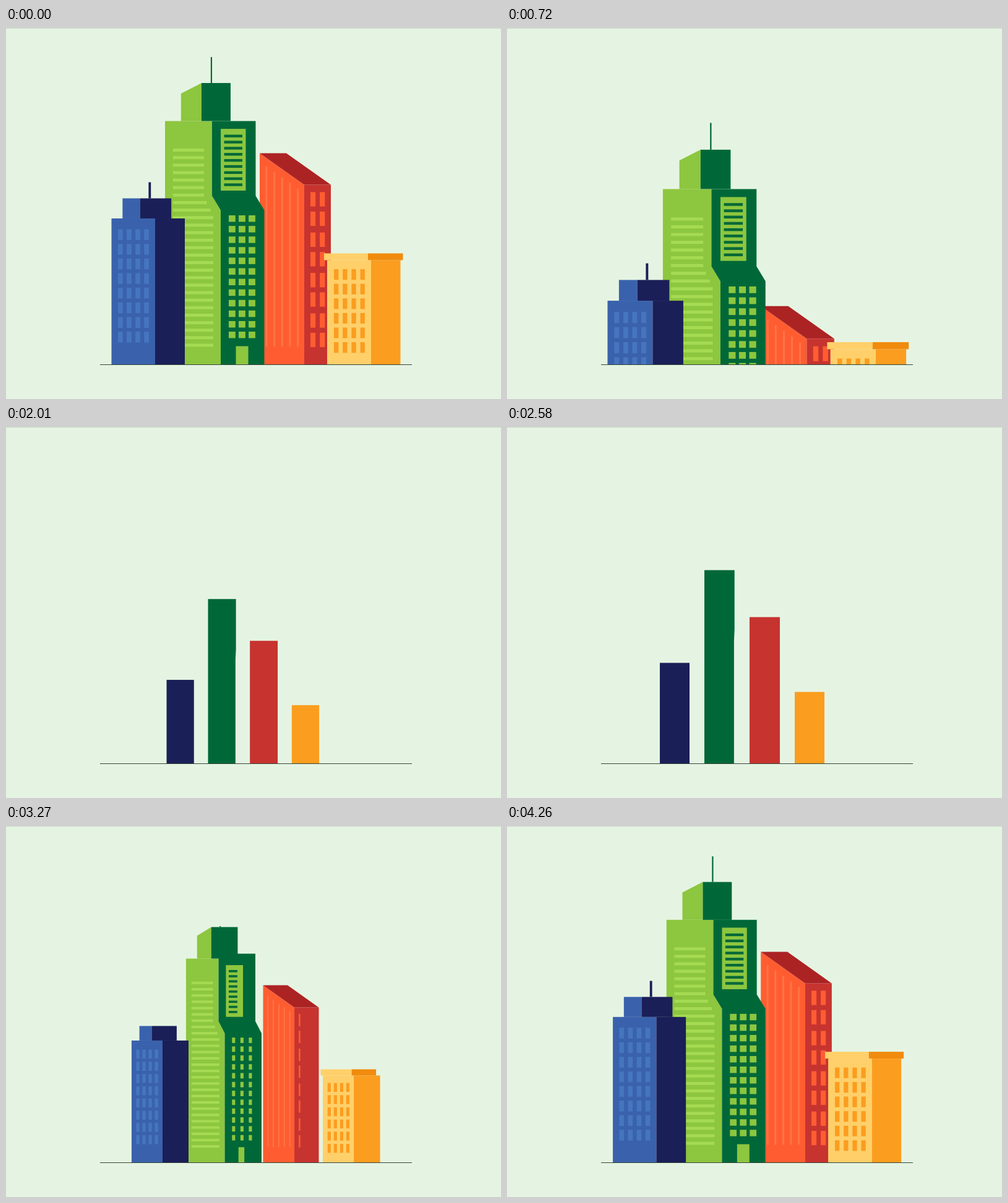
Animation, 800 px wide and 600 px high, one loop 4290 ms. Source, as an HTML page with a canvas:

```html
<!DOCTYPE html>
<html lang="en">
<head>
<meta charset="utf-8">
<title>City chart</title>
<style>
  html, body { margin: 0; width: 100%; height: 100%; overflow: hidden; background: #e5f4e2; }
  canvas { display: block; }
</style>
</head>
<body>
<canvas id="stage" width="800" height="600"></canvas>
<script>
const ctx = document.getElementById('stage').getContext('2d');
const LOOP = 4290, GROUND = 544.5, RISE = 1130, CENTER = 410;
const TIMES = [RISE, 1440, 1620, 2160, 2580, 3270, 3750, LOOP];
const C = {
  bg: '#e5f4e2', edge: '#cbd8c9', line: '#35443a',
  blue: '#3a62ac', blueWin: '#4675c0', navy: '#1b1f58',
  lime: '#8dc63f', limeBar: '#a5db52', green: '#006838',
  coral: '#ff5d31', coralBar: '#ff7447', red: '#c7332f', roof: '#ac2324',
  sand: '#ffd06a', amber: '#fb9d1f', cap: '#f08b0e'
};

// Values at 1440, 2580, 3270, 3750 and 4290 ms; three values mean absent until 2580.
const BUILDINGS = {
  red: {
    x: [395.5, 392, 415.5, 415, 410], w: [42.5, 49, 39.5, 41, 43], lw: [50.5, 66, 72],
    h: [124, 237, 251, 273.5, 291], roof: [36, 47.5, 51], open: [.33, 1, 1], open2: [0, 1, 1]
  },
  green: {
    x: [331, 319, 343.5, 341, 333], w: [43, 48.7, 59.5, 66, 70.5], lw: [52.5, 70.5, 76],
    h: [175, 313, 330, 368.5, 394], lip: [8, 0, 0], dx: [-.8, -.8, 10, 13.3, 14],
    top: [51, 57.5, 61.5], topR: [.5, .5, .52, .425, .425], mast: [1.5, 31, 42],
    open: [.56, 1, 1], panel: [.81, 1, 1]
  },
  blue: {
    x: [267, 247, 253, 247.5, 241], w: [42, 48, 42, 44.5, 48], lw: [50, 66, 70.5],
    h: [82, 163, 197.5, 221, 236.5], top: [23.5, 30.5, 32.5], mast: [0, 24.5, 26]
  },
  orange: {
    x: [460, 465, 562, 586.5, 590], w: [42, 48, 42.5, 44.5, 47.5], lw: [50, 66, 71],
    h: [53, 116, 141, 158, 169], cap: [10, 10.5, 11], capL: [-3.5, -5, -5], capR: [-6.5, 4, 4]
  }
};
// Full height and the moment each building has sunk away.
const SINK = { red: [342, 813], green: [498, 1250], blue: [295, 970], orange: [180, 784] };

const mix = (a, b, k) => a + (b - a) * k;

// Monotone cubic through the points (xs, ys).
function curve(xs, ys, t) {
  const n = xs.length - 1;
  if (t <= xs[0]) return ys[0];
  if (t >= xs[n]) return ys[n];
  const slope = i => (ys[i + 1] - ys[i]) / (xs[i + 1] - xs[i]);
  const tangent = i => {
    if (i === 0) return slope(0);
    if (i === n) return slope(n - 1);
    const a = slope(i - 1), b = slope(i);
    return a * b <= 0 ? 0 : 2 * a * b / (a + b);
  };
  let i = 0;
  while (t > xs[i + 1]) i++;
  const d = xs[i + 1] - xs[i], s = (t - xs[i]) / d, s2 = s * s, s3 = s2 * s;
  return ys[i] * (2 * s3 - 3 * s2 + 1) + ys[i + 1] * (3 * s2 - 2 * s3)
    + d * (tangent(i) * (s3 - 2 * s2 + s) + tangent(i + 1) * (s3 - s2));
}

function pose(name, t) {
  const p = {};
  for (const [key, list] of Object.entries(BUILDINGS[name])) {
    const [a, b, ...rest] = list.length === 3 ? [0, 0, ...list] : list;
    const early = key === 'h'
      ? [0, a, mix(a, b, .297), mix(a, b, .768)]
      : [mix(a, b, -.03), a, mix(a, b, .1), mix(a, b, .5)];
    p[key] = curve(TIMES, [...early, b, ...rest], t);
  }
  p.y = GROUND - p.h;
  return p;
}

function box(color, x0, y0, x1, y1) {
  if (x1 - x0 < .01 || y1 - y0 < .01) return;
  ctx.fillStyle = color;
  ctx.fillRect(x0, y0, x1 - x0, y1 - y0);
}

function poly(color, ...pts) {
  ctx.fillStyle = color;
  ctx.beginPath();
  for (let i = 0; i < pts.length; i += 2) ctx.lineTo(pts[i], pts[i + 1]);
  ctx.fill();
}

// Box in fractions of a face that spans x, y, w, h.
function part(color, x, y, w, h, fx, fy, fw, fh) {
  box(color, x + fx * w, y + fy * h, x + (fx + fw) * w, y + (fy + fh) * h);
}

function grid(cols, rows, fn) {
  for (let r = 0; r < rows; r++) for (let c = 0; c < cols; c++) fn(c, r);
}

const draw = {
  red({ x, y, w, lw, h, roof, open, open2 }) {
    const m = x + lw, apex = y - roof;
    if (lw > .05) {
      poly(C.coral, x, apex, m, y, m, GROUND, x, GROUND);
      poly(C.roof, x, apex, x + w, apex, m + w, y, m, y);
      for (let i = 0; i < 5; i++) {
        const f = .132 + i * .176;
        box(C.coralBar, x + f * lw, apex + (f + .02) * roof + .046 * h, x + (f + .04) * lw, GROUND - .1 * h);
      }
    }
    box(C.red, m, y, m + w, GROUND);
    grid(2, 8, (c, r) => {
      const fy = .041 + (r >> 1) * .2245 + (r % 2) * .108;
      const k = c ? open2 : open;
      part(C.coral, m, y, w, h, (c ? .585 : .233) - (1 - k) * .08, fy, .19 * k, .08);
    });
  },

  green({ x, y, w, lw, h, lip, dx, top, topR, mast, open, panel }) {
    const left = x - lw, n1 = y + .307 * h, n2 = y + .366 * h, inner = x + Math.max(0, dx);
    if (lw > .05) {
      poly(C.lime, left, y, x, y, x, n1, inner, n2, inner, GROUND, left, GROUND);
      for (let i = 0; i < 27; i++) {
        const end = i < 7 ? .83 : i === 7 ? .89 : i === 8 ? .967 : 1.026;
        part(C.limeBar, left, y, lw, h, .168, .113 + i * .0308, end - .168, .0125);
      }
    }
    poly(C.green, x, y - lip, x + w, y - lip, x + w, n1, x + w + dx, n2,
      x + w + dx, GROUND, inner, GROUND, inner, n2, x, n1);

    if (top > .05) {
      const pl = left + .34 * lw, pm = left + .776 * lw, pr = x + topR * w, py = y - top;
      poly(C.lime, pl, py + .275 * top, pm, py, pm, y, pl, y);
      box(C.green, pm, py, pr, y);
      const mx = pm + .34 * (pr - pm);
      box(C.green, mx - 1.1, py - mast, mx + 1.1, py);
    }

    part(C.lime, x, y, w, h, .2, .032, .573 * panel, .2535);
    for (let i = 0; i < 9; i++)
      part(C.green, x, y, w, h, .277, .056 + i * .025, .418 * open, .011);
    const shift = (1 - open) * .2;
    grid(3, 12, (c, r) =>
      part(C.lime, inner, y, w, h, .184 + c * .228 + .153 * shift, .387 + r * .0434, .153 * open, .0266));
    part(C.lime, inner, y, w, h, .348 + .284 * shift, .924, .284 * open, .076);
  },

  blue({ x, y, w, lw, h, top, mast }) {
    const left = x - lw;
    box(C.blue, left, y, x, GROUND);
    box(C.navy, x, y, x + w, GROUND);
    grid(4, 8, (c, r) =>
      part(C.blueWin, left, y, lw, h, .149 + c * .2, .074 + r * .1, .108, .074));
    const pm = left + .66 * lw, pr = x + .545 * w, py = y - top;
    if (top > .05) {
      box(C.blue, left + .253 * lw, py, pm, y);
      box(C.navy, pm, py, pr, y);
      const mx = pm + .305 * (pr - pm);
      box(C.navy, mx - 1.9, py - mast, mx + 1.9, py);
    }
  },

  orange({ x, y, w, lw, h, cap, capL, capR }) {
    const left = x - lw;
    box(C.sand, left, y, x, GROUND);
    box(C.amber, x, y, x + w, GROUND);
    grid(4, 6, (c, r) =>
      part(C.amber, left, y, lw, h, .155 + c * .2, .086 + r * .1397, .103, .102));
    box(C.sand, left + capL, y - cap, x + capL, y);
    box(C.cap, x + capL, y - cap, x + w + capR, y);
  }
};

function sinking(t) {
  const s = curve([0, 540, 720, 1000], [1, 1.0325, 1.0335, 1.036], t);
  for (const name in BUILDINGS) {
    const [height, end] = SINK[name];
    if (t >= end) continue;
    const drop = height * s * Math.pow(t / end, 2.6);
    ctx.save();
    ctx.translate(CENTER, GROUND + drop);
    ctx.scale(s, s);
    ctx.translate(-CENTER, -GROUND);
    draw[name](pose(name, LOOP));
    ctx.restore();
  }
}

function render(t) {
  box(C.bg, 0, 0, 800, 600);
  box(C.edge, 0, 0, 800, 1);
  ctx.save();
  ctx.beginPath();
  ctx.rect(0, 0, 800, GROUND);
  ctx.clip();
  if (t > RISE) for (const name in BUILDINGS) draw[name](pose(name, t));
  sinkingOrNothing(t);
  ctx.restore();
  box(C.line, 152, 544, 656, 545);
}

function sinkingOrNothing(t) {
  if (t < SINK.green[1]) sinking(t);
}

const start = performance.now();
function tick() {
  render((performance.now() - start) % LOOP);
  requestAnimationFrame(tick);
}
tick();
</script>
</body>
</html>
```
